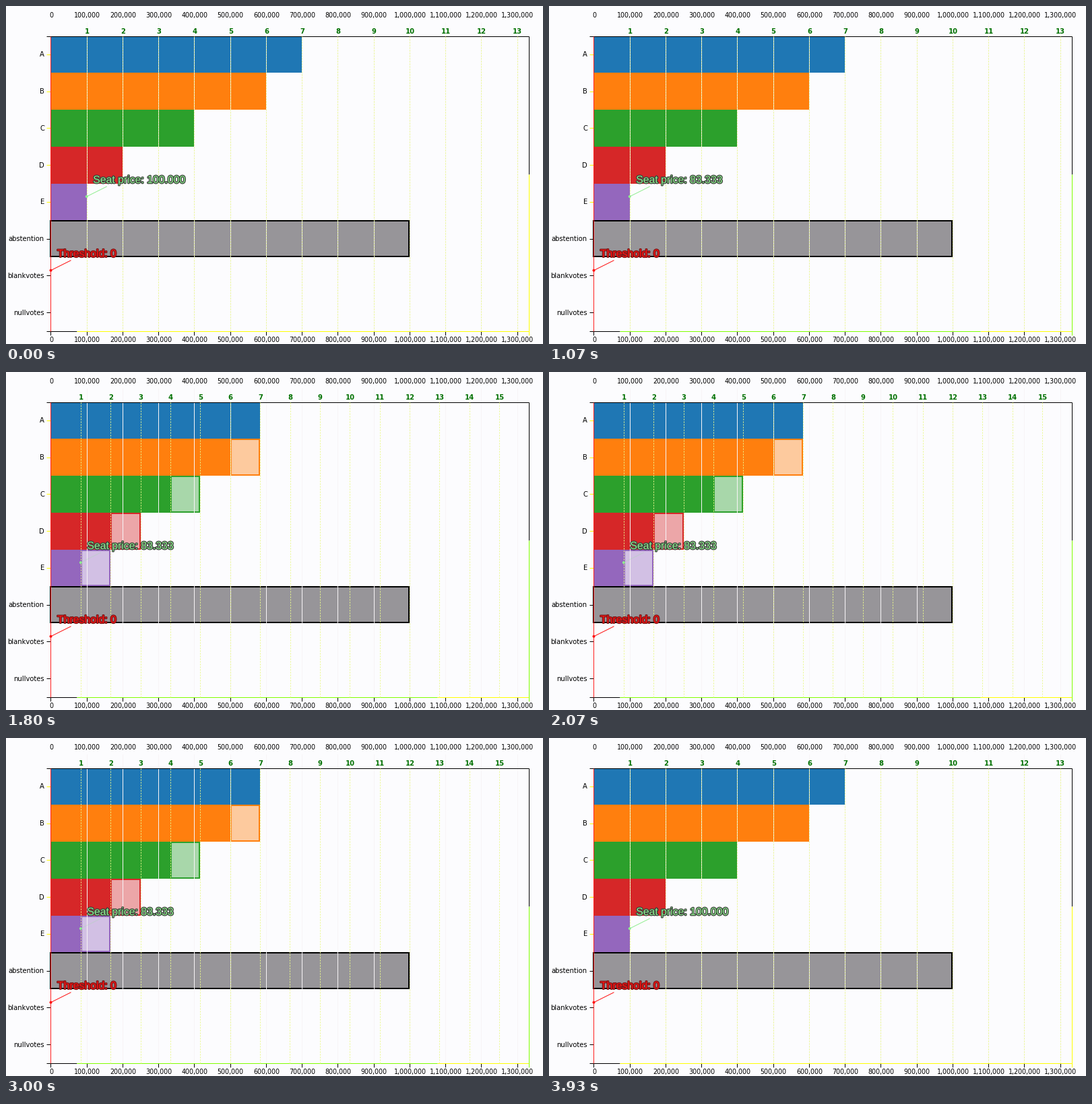
A matplotlib script that plays this animation: 797x502 px, repeating every 3990 ms.

```python
import matplotlib.pyplot as plt
from matplotlib.animation import FuncAnimation
from matplotlib.patches import Circle, Rectangle
from matplotlib.patheffects import withStroke

W, H, DPI = 797, 502, 64
PT = 72 / DPI                       # points per pixel
FRAMES, STEP = 114, 35              # 3990 ms loop
GO, BACK, EASE_MS = 990, 3050, 800  # transition starts and length

X0, X1, Y0, Y1 = 66.5, 776.5, 44.5, 482.5
UNIT = (X1 - X0) * 3 / 40           # pixels per 100,000 votes
BAND = (Y1 - Y0) / 8
ROWS = ["A", "B", "C", "D", "E", "abstention", "blankvotes", "nullvotes"]
COLORS = ["#1f77b4", "#ff7f0e", "#2ca02c", "#d62728", "#9467bd"]
SEATS = [7, 6, 4, 2, 1]
SEATS_AFTER = [7, 7, 5, 3, 2]
PRICE_AFTER = 5 / 6
YELLOW, LIME = "#ffff00", "#80ff00"

plt.rcParams["font.family"] = "DejaVu Sans"
fig = plt.figure(figsize=(W / DPI, H / DPI), dpi=DPI, facecolor="#fcfcfe")
ax = fig.add_axes([0, 0, 1, 1])
ax.set(xlim=(0, W), ylim=(H, 0))
ax.axis("off")


def line(x, y, color="black", width=1, z=4, **kw):
    return ax.plot(x, y, color=color, lw=width * PT, zorder=z,
                   solid_capstyle="butt", dash_capstyle="butt", **kw)[0]


def label(x, y, s, size=10, color="black", ha="center", z=6, **kw):
    return ax.text(x, y, s, size=size * PT, color=color, ha=ha,
                   va="baseline", zorder=z, **kw)


def rect(x, y, w, h, z=1, **kw):
    return ax.add_patch(Rectangle((x, y), w, h, zorder=z, **kw))


def note(x, y, s, color, outline):
    """Dot, slanted connector and outlined text."""
    dot = ax.add_patch(Circle((x, y), 2, color=color, lw=0, zorder=8))
    arm = line([x, x + 30], [y, y - 15], color, z=8)
    text = label(x + 9.5, y - 20, s, 15.8, color, "left", 9,
                 family="Liberation Sans",
                 path_effects=[withStroke(linewidth=2.6 * PT,
                                          foreground=outline)])
    return dot, arm, text


def place_note(parts, x):
    dot, arm, text = parts
    dot.center = (x, dot.center[1])
    arm.set_xdata([x, x + 30])
    text.set_x(x + 9.5)


# Vote scale and grid
for k in range(14):
    x = X0 + k * UNIT
    votes = f"{k * 100000:,}"
    label(x + 0.5, 17, votes, 9.5)
    label(x + 0.5, 499, votes, 9.5)
    line([x, x], [Y1, Y1 + 6])
    if k:
        line([x, x], [24, Y1], "#f7f4f6", z=3)

# Frame
line([X0 - 6, X1], [Y0, Y0])
line([X0 - 6, 105], [Y1, Y1])
line([640, X1], [Y1, Y1], YELLOW)
line([X1, X1], [Y0, 250])
tinted = [line([105, 640], [Y1, Y1], YELLOW),
          line([X1, X1], [250, Y1 + 6], YELLOW)]

# Rows
for i, name in enumerate(ROWS):
    y = Y0 + (i + 0.5) * BAND
    label(57, y + 3.5, name, ha="right")
    line([X0 - 6, X0], [y, y], YELLOW if i < 5 else "black")

bars, extras = [], []
for i, color in enumerate(COLORS):
    y = Y0 + i * BAND
    bars.append(rect(X0, y, 0, BAND, color=color, lw=0))
    extras.append((rect(X0, y, 0, BAND, color=color, alpha=0.4, lw=0),
                   rect(X0, y + 1, 0, BAND - 2, z=2, fill=False,
                        ec=color, lw=2 * PT)))
rect(X0, Y0 + 5 * BAND + 1, 10 * UNIT - 1, BAND - 2,
     fc="#979599", ec="black", lw=2 * PT)

# Seat scale
seats = [(n, line([0, 0], [Y0, Y1], "#eaf98c", z=4,
                  linestyle=(0, (2, 2))),
          label(0, 41, str(n), color="#007000", weight="bold"))
         for n in range(1, 16)]

line([X0, X0], [Y0, Y1], "#ff2020", z=7)
note(X0, 392.7, "Threshold: 0", "#ff1010", "#7a1a1a")
price_note = note(X0, 283, "", "#90ee90", "#3c443c")


def cubic(u):
    u = min(max(u, 0), 1)
    return 4 * u ** 3 if u < 0.5 else 1 - 4 * (1 - u) ** 3


def update(k):
    t = k * STEP
    shifted = GO <= t < BACK
    e = cubic((t - GO) / EASE_MS) - cubic((t - BACK) / EASE_MS)
    price = 1 + (PRICE_AFTER - 1) * e
    seat = UNIT * price

    for bar, (fill, edge), n, m in zip(bars, extras, SEATS, SEATS_AFTER):
        solid = n * seat
        total = UNIT * (n + (m * PRICE_AFTER - n) * e)
        extra = total - solid
        bar.set_width(solid)
        fill.set_x(X0 + solid)
        fill.set_width(extra)
        edge.set_x(X0 + solid + 1)
        edge.set_width(max(extra - 2, 0))
        edge.set_visible(extra > 1)

    for n, tick, text in seats:
        x = X0 + n * seat
        alpha = 1 if n <= 13 else e
        tick.set_xdata([x, x])
        text.set_x(x + 0.5)
        for part in (tick, text):
            part.set_alpha(alpha)
            part.set_visible(alpha > 0 and x < W + 10)

    place_note(price_note, X0 + seat)
    price_note[1].set_alpha(1 - 0.75 * e)
    price_note[2].set_text("Seat price: " + ("83.333" if shifted else "100.000"))
    for part in tinted:
        part.set_color(LIME if shifted else YELLOW)


anim = FuncAnimation(fig, update, frames=FRAMES, interval=STEP,
                     init_func=lambda: update(0), repeat=True)
plt.show()
```
